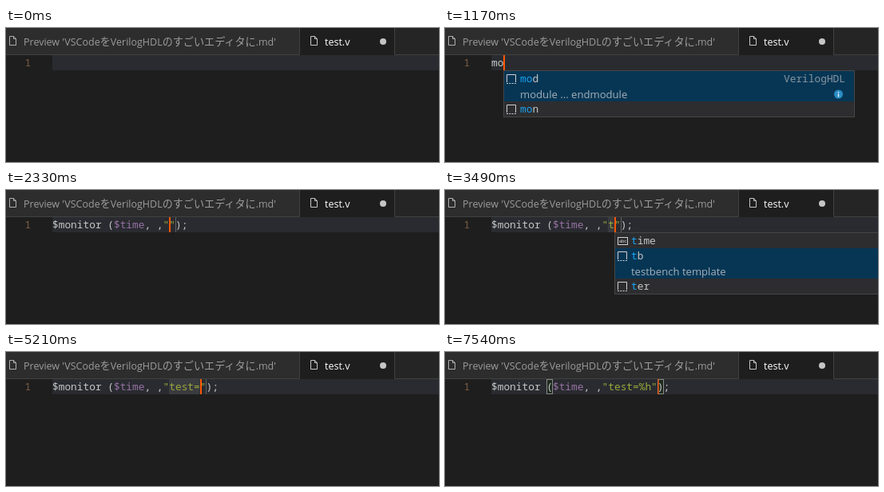
Animation, 542 px wide and 168 px high, one loop 8.47 s. Source, as an HTML page:

```html
<!DOCTYPE html>
<html lang="ja">
<head>
<meta charset="utf-8">
<title>Snippet completion in an editor</title>
<style>
  html, body { margin: 0; width: 100%; height: 100%; overflow: hidden; background: #1e1e1e; }
  svg { display: block; width: 542px; height: 168px; }
  text { white-space: pre; }
  .ui { font: 12.5px "Open Sans", "Noto Sans", "Noto Sans CJK JP", "Noto Sans CJK", sans-serif; }
  .ja { font: 13.1px "Noto Sans CJK JP", "Noto Sans CJK", sans-serif; }
  .detail { font-size: 13.1px; }
  .code { font: 500 12.83px "Noto Sans Mono", "DejaVu Sans Mono", monospace; fill: #c5c8c6; }
  .string { fill: #9aa83a; }
  .variable { fill: #9872a2; }
  .match { fill: #18a3f0; }
</style>
</head>
<body>
<svg viewBox="0 0 542 168">
  <defs>
    <path id="file" d="M.5.5h5l3 3v8h-8zM5.5.5v3h3" fill="none" stroke="#c5c5c5"/>
    <g id="snippet" fill="none" stroke="#d0d0d0">
      <path d="M.5 10V.5h11V10"/>
      <path d="M0 11.5h12" stroke-dasharray="2 1.3"/>
    </g>
    <g id="word">
      <rect x=".5" y="1.5" width="12" height="9" fill="none" stroke="#d0d0d0"/>
      <text x="6.5" y="8" font-family="Liberation Sans, sans-serif" font-size="6" text-anchor="middle" fill="#d0d0d0">abc</text>
    </g>
  </defs>

  <rect width="542" height="168" fill="#1e1e1e"/>
  <rect width="542" height="34" fill="#252526"/>
  <rect width="367" height="34" fill="#2d2d2d"/>
  <rect x="368" width="118" height="34" fill="#1e1e1e"/>
  <path d="M0 33.5H367.5V0M486.5 0V33.5H542" fill="none" stroke="#414141"/>
  <use href="#file" x="4" y="10" opacity=".85"/>
  <use href="#file" x="381" y="10"/>
  <text class="ui" x="22" y="22" fill="#9c9c9c">Preview 'VSCode<tspan class="ja">を</tspan>VerilogHDL<tspan class="ja">のすごいエディタに</tspan>.md'</text>
  <text class="ui" x="399" y="22" fill="#fff">test.v</text>
  <circle cx="472" cy="17" r="4" fill="#c5c5c5"/>

  <rect x="58" y="34" width="484" height="19" fill="#292b30"/>
  <text class="code" x="23.5" y="48" style="fill:#7d5f45">1</text>
  <g id="marks"></g>
  <text id="line" class="code" x="58" y="48"></text>
  <rect id="caret" y="34" width="2" height="19" fill="#fc5604"/>
  <g id="popup"></g>
  <path id="pointer" d="M0 .5h2.5l1 1 1-1H7M3.5 1.5v13M0 15.5h2.5l1-1 1 1H7" fill="none" stroke="#ddd"/>
</svg>
<script>
const LOOP = 8470, LEFT = 58, CELL = 7.697, ROW = 19;
const FIELD = 19; // column just inside the quotes
const $ = id => document.getElementById(id);
const columnX = n => Math.round(LEFT + n * CELL);

const item = (label, hits, detail = '', icon = 'snippet') => ({ label, hits, detail, icon });
const mod = hits => item('mod', hits, 'module ... endmodule');
const mon = (hits, detail) => item('mon', hits, detail);

const menus = {
  m: { at: 1, pick: 0, items: [mod(1), mon(1)] },
  mo: { at: 2, pick: 0, items: [mod(2), mon(2)] },
  mon: { at: 3, pick: 0, items: [mon(3, '$monitor')] },
  t: { at: 20, pick: 1, items: [item('time', 1, '', 'word'), item('tb', 1, 'testbench template'), item('ter', 1)] },
  te: { at: 21, pick: 0, items: [item('ter', 2, 'ternary operator')] }
};

// Each step holds until the next one starts.
const steps = [
  { t: 0 },
  { t: 1070, plain: 'm' },
  { t: 1120, plain: 'm', menu: 'm' },
  { t: 1170, plain: 'mo', menu: 'mo' },
  { t: 1500, plain: 'mon', menu: 'mo' },
  { t: 1540, plain: 'mon', menu: 'mon' },
  { t: 1810, field: '' },
  { t: 3490, field: 't', menu: 't' },
  { t: 3540, field: 'te', menu: 'te' },
  { t: 3720, field: 'tes' },
  { t: 3870, field: 'test' },
  { t: 4750, field: 'test=' },
  { t: 5600, field: 'test=%' },
  { t: 6470, field: 'test=%h' },
  { t: 7080, field: 'test=%h', done: true },
  { t: 7540, field: 'test=%h', done: true, dim: true }
];

const rect = (x, y, w, h, style) => `<rect x="${x}" y="${y}" width="${w}" height="${h}" ${style}/>`;

function menuMarkup({ at, pick, items }) {
  const x = columnX(at), top = 53;
  const height = (items.length + 1) * ROW + 2;
  let y = top + 1, rows = '';
  items.forEach(({ label, hits, detail, icon }, i) => {
    const picked = i === pick;
    if (picked) {
      rows += rect(x + 1, y, 438, ROW * 2, 'fill="#073655"');
      rows += `<text class="code" x="${x + 428}" y="${y + 14}" text-anchor="end" style="fill:#8796a0">VerilogHDL</text>
        <text class="ui detail" x="${x + 21}" y="${y + 34}" fill="#a3b1ba">${detail}</text>
        <circle cx="${x + 419.5}" cy="${y + 29}" r="5.5" fill="#2a8cc4"/>
        <path d="M${x + 419.5} ${y + 26}v1.5m0 1v4" stroke="#e8f4fb" stroke-width="1.4"/>`;
    }
    rows += `<use href="#${icon}" x="${x + 4}" y="${y + 4}"/>
      <text class="code" x="${x + 21}" y="${y + 14}"><tspan class="match">${label.slice(0, hits)}</tspan>${label.slice(hits)}</text>`;
    y += picked ? ROW * 2 : ROW;
  });
  return rect(x, top, 440, height, 'fill="#2d2d30"') + rows +
    rect(x + .5, top + .5, 439, height - 1, 'fill="none" stroke="#454545"');
}

function lineMarkup({ plain = '', field }) {
  if (field === undefined) return plain;
  return `$monitor (<tspan class="variable">$time</tspan>, ,<tspan class="string">"${field}"</tspan>);`;
}

function marksMarkup({ field, done }) {
  if (field === undefined) return '';
  const end = FIELD + field.length;
  if (done) {
    return [9, end + 1].map(n =>
      rect(columnX(n) + .5, 34.5, 7, 18, 'fill="#1e2a1e" stroke="#888"')).join('');
  }
  return rect(columnX(FIELD), 34, field.length * CELL, ROW, 'fill="#7c7c7c" fill-opacity=".2"') +
    rect(columnX(end + 1), 34, 1, ROW, 'fill="#606060"');
}

function caretColumn({ plain, field, done }) {
  return field === undefined ? plain.length : FIELD + field.length + (done ? 1 : 0);
}

let shown;
function showStep(step) {
  if (step === shown) return;
  shown = step;
  $('line').innerHTML = lineMarkup(step);
  $('marks').innerHTML = marksMarkup(step);
  $('popup').innerHTML = step.menu ? menuMarkup(menus[step.menu]) : '';
  const typing = step.t > 0;
  $('caret').setAttribute('visibility', typing ? 'visible' : 'hidden');
  $('caret').setAttribute('opacity', step.dim ? .65 : 1);
  if (typing) $('caret').setAttribute('x', columnX(caretColumn(step)));
}

function showPointer(t) {
  const k = Math.floor((t - 30) / 70);
  const visible = t >= 30 && t < 240;
  $('pointer').setAttribute('visibility', visible ? 'visible' : 'hidden');
  if (visible) $('pointer').setAttribute('transform', `translate(${511 - k * 6} ${117 + k * 9})`);
}

function render(t) {
  showStep(steps.findLast(step => step.t <= t));
  showPointer(t);
}

const start = performance.now();
function tick(now) {
  render(Math.max(0, now - start) % LOOP);
  requestAnimationFrame(tick);
}
render(0);
requestAnimationFrame(tick);
</script>
</body>
</html>
```
